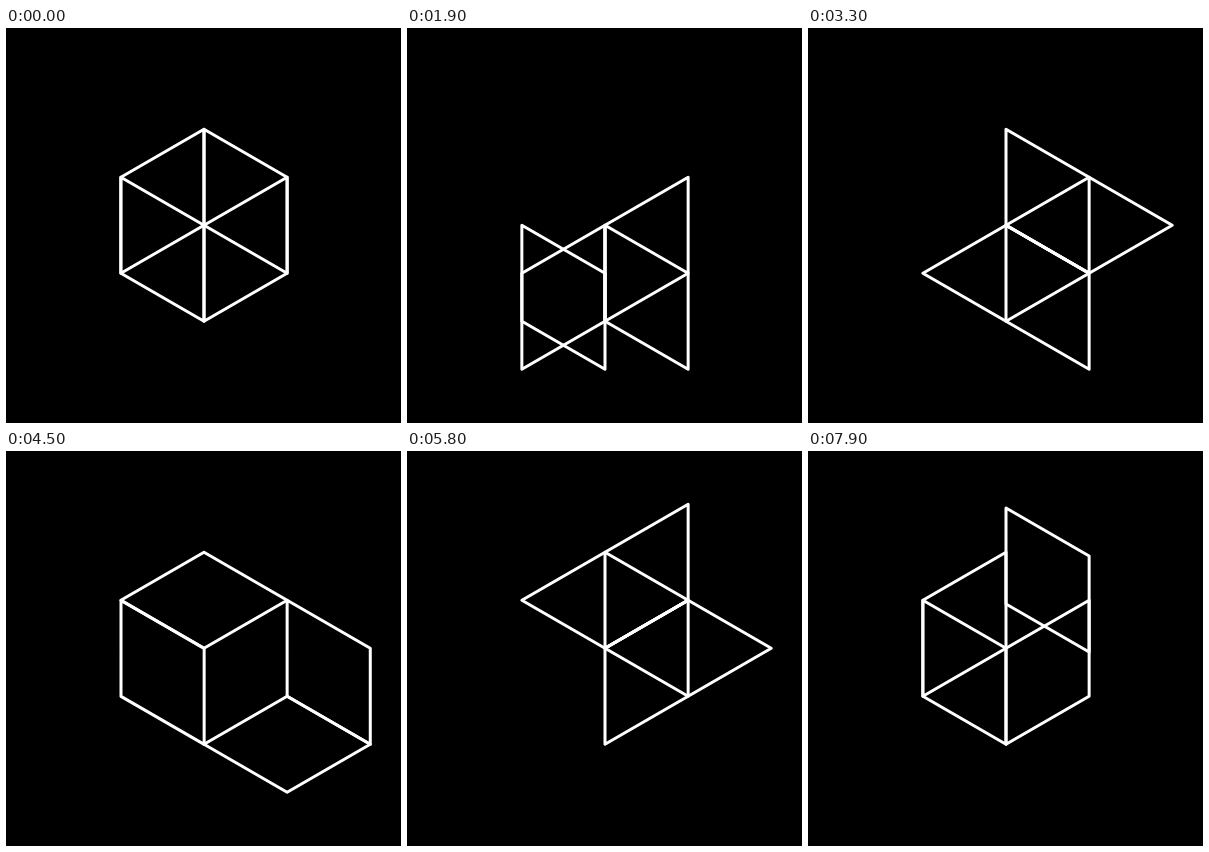
These frames come from a looping animation (395 by 395 pixels, 8000 ms). An HTML page with a canvas:

```html
<!DOCTYPE html>
<html lang="en">
<head>
<meta charset="utf-8">
<title>Hexagon panels</title>
<style>
  html, body { margin: 0; height: 100%; overflow: hidden; background: #000; }
  canvas { display: block; }
</style>
</head>
<body>
<canvas id="stage" width="395" height="395"></canvas>
<script>
const ctx = document.getElementById('stage').getContext('2d');
const LOOP = 8000, SLIDE = 250, STAGGER = 285;
const CENTER = { x: 198, y: 197.3 }, RADIUS = 96;

// Four rhombic panels, named by the angle they point to, slide one after
// another along `direction`, then slide home in the same order.
const trips = [
  { direction: 90, panels: [30, 150, 210, 330], out: 170, back: 1491 },
  { direction: 30, panels: [270, 150, 90, 330], out: 2758, back: 3979 },
  { direction: -30, panels: [90, 210, 270, 30], out: 5258, back: 6479 },
  { direction: -90, panels: [330, 210, 150, 30], out: 7780, back: Infinity },
];

function polar(angle, length) {
  const a = angle * Math.PI / 180;
  return { x: length * Math.cos(a), y: length * Math.sin(a) };
}

function ease(p) {
  p = Math.min(1, Math.max(0, p));
  const half = q => 0.5 * Math.pow(2 * q, 2.5);
  return p < 0.5 ? half(p) : 1 - half(1 - p);
}

function drawPanel(angle, shift) {
  const x = CENTER.x + shift.x, y = CENTER.y + shift.y;
  ctx.beginPath();
  ctx.moveTo(x, y);
  for (const turn of [-60, 0, 60]) {
    const corner = polar(angle + turn, RADIUS);
    ctx.lineTo(x + corner.x, y + corner.y);
  }
  ctx.closePath();
  ctx.stroke();
}

function draw(time) {
  ctx.fillStyle = '#000';
  ctx.fillRect(0, 0, 395, 395);
  ctx.strokeStyle = '#fff';
  ctx.lineWidth = 3;
  ctx.lineJoin = 'round';
  const trip = trips.findLast(t => time >= t.out) || trips[0];
  trip.panels.forEach((angle, i) => {
    const progress = start => ease((time - start - i * STAGGER) / SLIDE);
    const offset = progress(trip.out) - progress(trip.back);
    drawPanel(angle, polar(trip.direction, RADIUS * offset));
  });
}

const begin = performance.now();
function tick() {
  draw((performance.now() - begin) % LOOP);
  requestAnimationFrame(tick);
}
tick();
</script>
</body>
</html>
```
